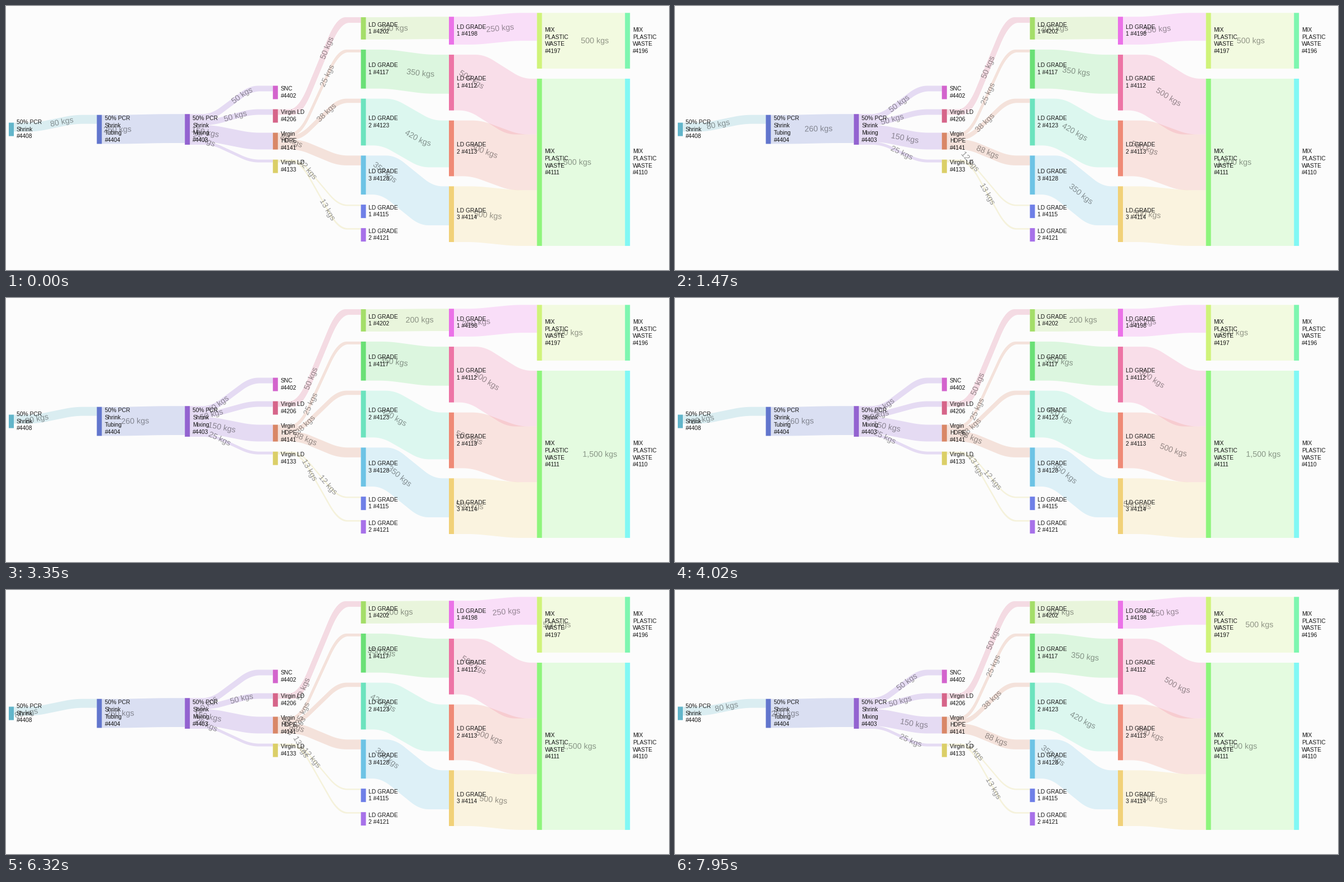
Animation of 1187x472 px, one loop 7990 ms. Source, as a matplotlib script:

```python
import colorsys

import numpy as np
import matplotlib.pyplot as plt
from matplotlib.animation import FuncAnimation
from matplotlib.patches import PathPatch
from matplotlib.path import Path
from matplotlib.textpath import TextPath

W, H, DPI = 1187, 472, 64
FRAMES, STEP = 235, 34
FONT = "Liberation Sans"
LEFT, COL_STEP, MIDDLE = 5, 157.6, 220.6
NODE_W, NODE_MIN, GAP, KG = 9, 24, 18, 0.1993
RAMP, ROUND = 0.46, 16          # sloped share of a link, corner softness
PERIOD, DRIFT = 6.9, 7.0        # label cycle and slide time in seconds

SHRINK, GRADE, MIX = "50% PCR\nShrink\n", "LD GRADE\n", "MIX\nPLASTIC\nWASTE\n"

COLUMNS = [
    [SHRINK + "#4408"],
    [SHRINK + "Tubing\n#4404"],
    [SHRINK + "Mixing\n#4403"],
    ["SNC\n#4402", "Virgin LD\n#4206", "Virgin\nHDPE\n#4141",
     "Virgin LD\n#4133"],
    [GRADE + end for end in ("1 #4202", "1 #4117", "2 #4123", "3 #4128",
                             "1 #4115", "2 #4121")],
    [GRADE + end for end in ("1 #4198", "1 #4112", "2 #4113", "3 #4114")],
    [MIX + "#4197", MIX + "#4111"],
    [MIX + "#4196", MIX + "#4110"],
]

# source: (sink, kilograms, head start of the label in seconds)
FLOWS = {
    4408: [(4404, 80, 0.6)],
    4404: [(4403, 260, -0.7)],
    4403: [(4402, 50, 0), (4206, 50, 0.9), (4141, 150, -0.5),
           (4133, 25, -0.4)],
    4206: [(4202, 50, 0)],
    4141: [(4117, 25, 0), (4123, 38, 0.4), (4128, 88, -0.1)],
    4133: [(4115, 12, 3.5), (4121, 13, 0)],
    4202: [(4198, 200, 3.6)],
    4117: [(4112, 350, 0.1)],
    4123: [(4113, 420, 0.3)],
    4128: [(4114, 350, -0.6)],
    4198: [(4197, 250, 1.1)],
    4112: [(4111, 500, -0.5)],
    4113: [(4111, 500, 3.3)],
    4114: [(4111, 500, 2.7)],
    4197: [(4196, 500, 0.3)],
    4111: [(4110, 1500, 3.5)],
}

cols = np.arange(W) + 0.5
rows = np.arange(H)[:, None]
canvas = np.full((H, W, 3), 0.991)


def cover(lo, hi, cell):
    """Share of each unit cell lying between lo and hi."""
    return np.clip(np.minimum(hi, cell + 1) - np.maximum(lo, cell), 0, 1)


def paint(x0, x1, top, bottom, color, alpha=1.0):
    mask = cover(top, bottom, rows) * cover(x0, x1, cols - 0.5) * alpha
    canvas[:] += mask[..., None] * (np.array(color) - canvas)


def soft(z):
    """Hinge at zero with a rounded corner."""
    bend = (np.clip(z, -ROUND, ROUND) + ROUND) ** 2 / (4 * ROUND)
    return bend + np.maximum(z - ROUND, 0)


def ramp(x, mid, run):
    return (soft(x - mid + run / 2) - soft(x - mid - run / 2)) / run


def node_color(share):
    """Two turns of the colour wheel, growing lighter and purer."""
    hue = (192 + 706 * share + 12 * np.sin(np.pi * share)) / 360
    return colorsys.hls_to_rgb(hue % 1, 0.59 + 0.15 * share,
                               0.5 + 0.4 * share)


class Node:
    def __init__(self, text, x, color):
        self.text, self.x, self.color = text, x, color
        self.id = int(text.split("#")[1])
        self.sent = self.got = 0.0
        out = sum(kg for _, kg, _ in FLOWS.get(self.id, []))
        into = sum(kg for links in FLOWS.values()
                   for sink, kg, _ in links if sink == self.id)
        self.height = max(NODE_MIN, KG * max(out, into))


class Label:
    """Text that slides back along a link and starts over."""

    def __init__(self, kg, x0, x1, y0, y1, lead):
        mid, run, dy = (x0 + x1) / 2, RAMP * (x1 - x0), y1 - y0
        self.x = np.linspace(x0 - 60, x1 + 60, 600)
        straight = 0.5 + (self.x - mid) / run
        share = np.where(self.x < mid, straight, ramp(self.x, mid, run))
        self.y = y0 + dy * share
        self.angle = np.arctan(np.gradient(self.y, self.x))
        length = np.hypot(np.diff(self.x), np.diff(self.y))
        arc = np.concatenate([[0], np.cumsum(length)])
        self.arc = arc - np.interp(mid, self.x, arc)

        extra = (np.hypot(run, dy) - run) / 2
        self.first = 0.25 * extra
        self.travel = (x1 - x0) / 2 + 0.75 * extra
        self.lead = lead

        glyphs = TextPath((0, 0), f"{kg:,} kgs", size=14.3,
                          prop={"family": FONT})
        self.along = glyphs.vertices[:, 0]
        self.up = glyphs.vertices[:, 1] - 4.4
        self.codes = glyphs.codes

    def points(self, now):
        age = (now + self.lead) % PERIOD
        left = (1 - age / DRIFT) ** 1.5
        s = self.first - self.travel * (1 - left) + self.along
        a = np.interp(s, self.arc, self.angle)
        x = np.interp(s, self.arc, self.x) + self.up * np.sin(a)
        y = np.interp(s, self.arc, self.y) - self.up * np.cos(a)
        return np.column_stack([x, y])


def add_link(src, dst, kg, lead):
    x0, x1, w = src.x + NODE_W, dst.x, kg * KG
    y0, y1 = src.top + src.sent, dst.top + dst.got
    src.sent += w
    dst.got += w
    mid, run, dy = (x0 + x1) / 2, RAMP * (x1 - x0), y1 - y0
    # both edges keep a constant distance from the centre line
    shift = w / 2 * np.tan(np.arctan2(dy, run) / 2)
    top = y0 + dy * ramp(cols, mid + shift, run)
    bottom = y0 + w + dy * ramp(cols, mid - shift, run)
    paint(x0, x1, top, bottom, src.color, 0.22)
    return Label(kg, x0, x1, y0 + w / 2, y1 + w / 2, lead)


nodes = {}
last = sum(map(len, COLUMNS)) - 1
for i, texts in enumerate(COLUMNS):
    stack = []
    for text in texts:
        color = node_color((len(nodes) + len(stack)) / last)
        stack.append(Node(text, LEFT + COL_STEP * i, color))
    total = sum(n.height for n in stack) + GAP * (len(stack) - 1)
    y = MIDDLE - total / 2
    for node in stack:
        node.top = y
        y += node.height + GAP
        nodes[node.id] = node

labels = [add_link(nodes[src], nodes[dst], kg, lead)
          for src, links in FLOWS.items() for dst, kg, lead in links]

fig = plt.figure(figsize=(W / DPI, H / DPI), dpi=DPI)
ax = fig.add_axes([0, 0, 1, 1])
ax.axis("off")

for node in nodes.values():
    paint(node.x, node.x + NODE_W, node.top, node.top + node.height,
          node.color)
    lines = node.text.split("\n")
    for i, line in enumerate(lines):
        y = node.top + node.height / 2 + 12.7 * (i - (len(lines) - 1) / 2)
        ax.text(node.x + NODE_W + 5, y + 2.9, line, family=FONT,
                color="#141414", size=10.3 * 72 / DPI, va="baseline", zorder=3)

fig.figimage(canvas, origin="upper", zorder=-1)
codes = np.concatenate([lab.codes for lab in labels])


def label_path(now):
    return Path(np.vstack([lab.points(now) for lab in labels]), codes)


flow_text = ax.add_patch(PathPatch(label_path(0), fc="black", alpha=0.4,
                                   lw=0, zorder=2))
ax.set_xlim(0, W)
ax.set_ylim(H, 0)


def update(i):
    t = i * STEP / 1000
    flow_text.set_path(label_path(1.135 * t - 0.025 * t * t))
    return [flow_text]


anim = FuncAnimation(fig, update, frames=FRAMES, interval=STEP,
                     repeat=True, repeat_delay=0)
plt.show()
```
